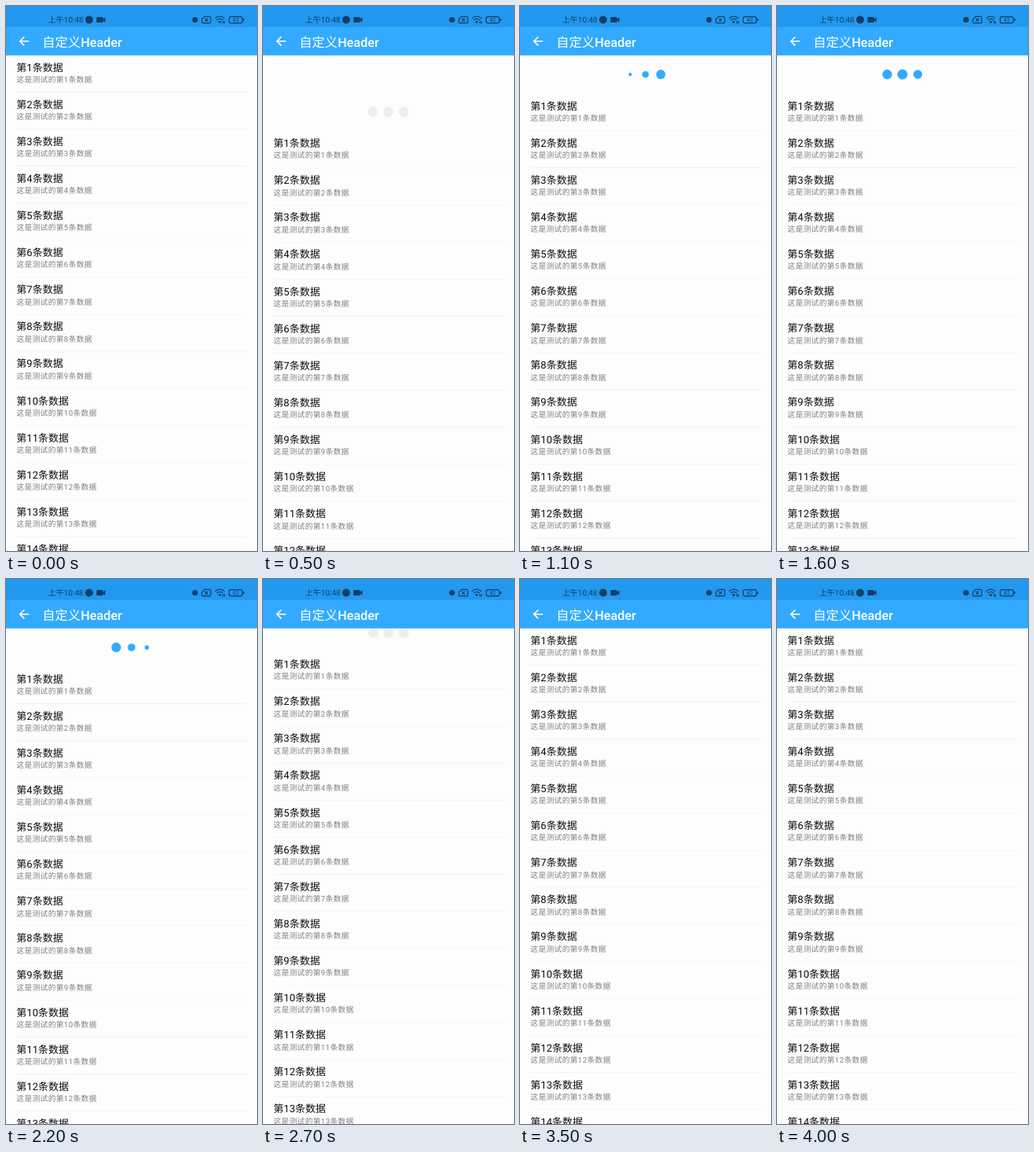
An HTML page that plays this animation: 320 px wide and 693 px high, repeating every 4.1 s.

```html
<!DOCTYPE html>
<html lang="zh-CN">
<head>
<meta charset="utf-8">
<title>自定义Header</title>
<style>
  html, body { margin: 0; width: 100%; height: 100%; overflow: hidden; background: #fdfdfd; }
  svg { display: block; width: 320px; height: 693px; font-family: Roboto, "Noto Sans CJK SC", "Noto Sans CJK", sans-serif; text-rendering: geometricPrecision; }
  .title { font-size: 13.03px; fill: #0c0c0c; }
  .note { font-size: 9.77px; letter-spacing: .325px; fill: #808080; }
  .heading { font-size: 16.29px; font-weight: 500; fill: #fff; }
  .clock { font-size: 10px; fill: #123f66; }
  .icon { fill: #123f66; }
  .line { fill: none; stroke: #123f66; stroke-width: 1.2; stroke-linejoin: round; }
</style>
</head>
<body>
<svg viewBox="0 0 320 693">
  <rect width="320" height="693" fill="#fdfdfd"/>
  <g id="content">
    <g id="dots"></g>
    <g id="list"></g>
  </g>

  <rect width="320" height="62.8" fill="#33aaff"/>
  <rect width="320" height="26.6" fill="#2298ee"/>

  <text class="clock" x="53.8" y="21.3">上午10:48</text>
  <circle class="icon" cx="106" cy="17.5" r="5"/>
  <path class="icon" d="M116 14h7q.6 0 .6.6v1.8l3-2.2v6.6l-3-2.2v1.8q0 .6-.6.6h-7q-.6 0-.6-.6v-5.8q0-.6.6-.6z"/>
  <circle class="icon" cx="241" cy="17.5" r="3.6"/>
  <path class="line" d="M253 13.3h6.5q1.5 0 1.5 1.5v5.4q0 1.5-1.5 1.5H251q-1.3 0-1.3-1.5v-3.4zM253.6 15.7l3.8 3.8m0-3.8l-3.8 3.8"/>
  <path class="line" d="M266.5 15.7q6-5 12 0M268.6 18q3.9-3.2 7.8 0"/>
  <path class="icon" d="M270.3 19.8q2.2-1.6 4.4 0l-2.2 2.4z"/>
  <path class="line" d="M276.6 19.3v3m1.9-3v3"/>
  <rect class="line" x="284.5" y="13.6" width="16.8" height="8" rx="2.3"/>
  <path class="icon" d="M302.3 15.8q1.6.3 1.6 1.8t-1.6 1.8z"/>
  <text class="icon" x="292.9" y="20.2" font-size="7" text-anchor="middle">42</text>

  <path d="M29.3 44.8H17.8M23.3 39.2l-5.6 5.6 5.6 5.6" fill="none" stroke="#fff" stroke-width="1.6"/>
  <text class="heading" x="46.3" y="52">自定义Header</text>
</svg>
<script>
  const LOOP = 4100, STEP = 100;
  const REST = 49, PEAK = 100;
  const RELEASE = 640, FINISH = 2662, SETTLE = 300;
  const PULSE_START = 590, PULSE = 750, LAG = 120, RATE = .95;
  const ROW = 47.11;
  const content = document.getElementById('content');

  function add(parent, tag, attrs, text = '') {
    const el = document.createElementNS('http://www.w3.org/2000/svg', tag);
    for (const key in attrs) el.setAttribute(key, attrs[key]);
    el.textContent = text;
    return document.getElementById(parent).appendChild(el);
  }

  for (let i = 0; i < 14; i++) {
    const y = i * ROW, label = `第${i + 1}条数据`;
    add('list', 'text', { class: 'title', x: 13.3, y: y + 82.55 }, label);
    add('list', 'text', { class: 'note', x: 13.3, y: y + 96.9 }, `这是测试的${label}`);
    add('list', 'rect', { x: 13, y: y + 109, width: 295, height: .8, fill: '#f2f2f2' });
  }
  const dots = [0, 1, 2].map(i => add('dots', 'circle', { cx: 140.5 + i * 19.5, cy: 38, r: 6.5 }));

  // Fast start with a long exponential tail.
  function viscous(u) {
    if (u <= 0) return 0;
    if (u >= 1) return 1;
    const x = u * 8, k = Math.exp(-1);
    return x < 1 ? x - 1 + Math.exp(-x) : k + (1 - k) * (1 - Math.exp(1 - x));
  }

  function pullOffset(t) {
    if (t < RELEASE) return PEAK * Math.sin(Math.PI / 2 * Math.min(1, t / 600));
    if (t < FINISH) return PEAK + (REST - PEAK) * viscous((t - RELEASE) / SETTLE);
    return REST * (1 - viscous((t - FINISH) / SETTLE));
  }

  function dotScale(t, i) {
    const age = (t - PULSE_START) * RATE - LAG * (i + 1);
    if (age <= 0) return 1;
    const p = .5 - .5 * Math.cos(Math.PI * (age % PULSE) / PULSE);
    return p < .5 ? 1 - 1.4 * p : 1.4 * p - .4;
  }

  function draw(now) {
    const t = Math.floor((now + 8) / STEP) * STEP % LOOP;
    const active = t >= RELEASE && t < FINISH;
    content.setAttribute('transform', `translate(0 ${pullOffset(t).toFixed(2)})`);
    dots.forEach((dot, i) => {
      dot.setAttribute('fill', active ? '#33aaff' : '#eeeeee');
      dot.setAttribute('r', 6.5 * (active ? dotScale(t, i) : 1));
    });
  }

  const start = performance.now();
  function tick() {
    draw(performance.now() - start);
    requestAnimationFrame(tick);
  }
  tick();
</script>
</body>
</html>
```
